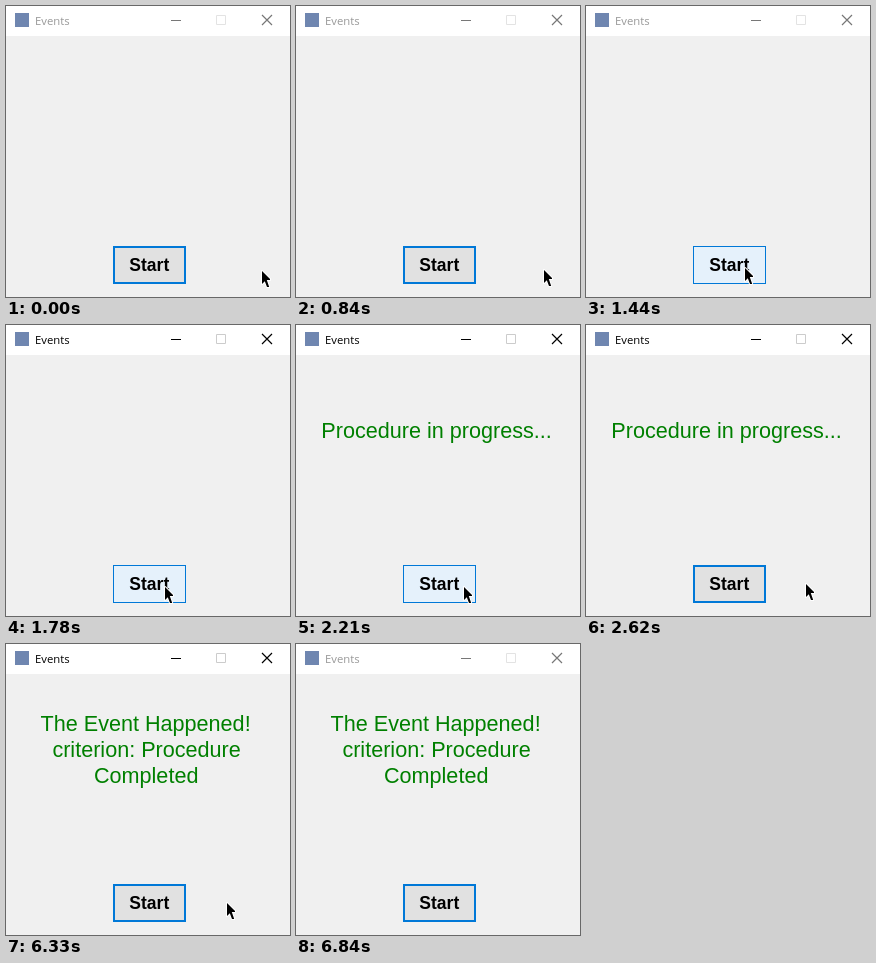
An HTML page for the animation above (6900 ms loop, 284x291 px).

```html
<!DOCTYPE html>
<html lang="en">
<head>
<meta charset="utf-8">
<title>Events</title>
<style>
  html, body { margin: 0; width: 100%; height: 100%; overflow: hidden; background: #f0f0f0; }
  svg { display: block; width: 100%; height: 100%; }
  .caption { font: 11.3px "Open Sans", "Noto Sans", sans-serif; }
  .label { font: 21.6px "Liberation Sans", Arial, sans-serif; fill: #008000; text-anchor: middle; }
  .start { font: bold 17.5px "Liberation Sans", Arial, sans-serif; text-anchor: middle; }
</style>
</head>
<body>
<svg viewBox="0 0 284 291">
  <rect width="284" height="291" fill="#f0f0f0"/>
  <rect width="284" height="30" fill="#fff"/>
  <rect x="9" y="7" width="14" height="14" fill="#6f86b0"/>
  <text id="caption" class="caption" x="29" y="19">Events</text>
  <g fill="none">
    <path id="minimize" d="M165 14.5h10"/>
    <path id="maximize" d="M210.5 9.5h9v9h-9z"/>
    <path id="close" d="M256 9l10 10M266 9l-10 10" stroke-width="1.2"/>
  </g>
  <g id="progress" class="label">
    <text x="140.6" y="113">Procedure in progress...</text>
  </g>
  <g id="done" class="label">
    <text x="139.6" y="87">The Event Happened!</text>
    <text x="140.6" y="113">criterion: Procedure</text>
    <text x="140.2" y="139">Completed</text>
  </g>
  <rect id="edge" x="107" y="240" width="73" height="38"/>
  <rect id="face"/>
  <text class="start" x="143.3" y="265">Start</text>
  <path id="cursor" d="M0 0V13L2.8 10.3L5 16H7.2L4.8 9H8V8Z"
    fill="#000" stroke="#fff" stroke-width="2" stroke-linejoin="round" paint-order="stroke"/>
</svg>
<script>
const LOOP = 6900;
const el = id => document.getElementById(id);
const set = (id, attrs) => {
  for (const name in attrs) el(id).setAttribute(name, attrs[name]);
};
const show = (id, on) => set(id, { visibility: on ? 'visible' : 'hidden' });
const between = (t, from, to) => t >= from && t < to;

// Pointer moves: first step, last step, number of steps, end position
const moves = [
  [780, 900, 3, 244, 263],
  [1050, 1440, 6, 159, 262],
  [2210, 2620, 7, 220, 259],
  [6330, 6330, 1, 221, 259],
  [6540, 6690, 3, 251, 298]
];

function pointerAt(t) {
  let x = 256, y = 265;
  for (const [start, end, steps, toX, toY] of moves) {
    if (t < start) break;
    const step = t >= end ? steps : 1 + Math.floor((t - start) / (end - start) * (steps - 1));
    x += (toX - x) * step / steps;
    y += (toY - y) * step / steps;
  }
  return [Math.round(x), Math.round(y)];
}

function drawButton(hover, pressed) {
  const border = hover ? 1 : 2;
  set('edge', { fill: pressed ? '#005499' : '#0078d7' });
  set('face', {
    x: 107 + border, y: 240 + border,
    width: 73 - 2 * border, height: 38 - 2 * border,
    fill: pressed ? '#cce4f7' : hover ? '#e5f1fb' : '#e1e1e1'
  });
}

function render(t) {
  const active = between(t, 1630, 6840);
  const [x, y] = pointerAt(t);
  set('caption', { fill: active ? '#000' : '#999' });
  set('minimize', { stroke: active ? '#000' : '#777' });
  set('close', { stroke: active ? '#000' : '#777' });
  set('maximize', { stroke: active ? '#ccc' : '#e3e3e3' });
  show('progress', between(t, 1870, 4270));
  show('done', t >= 4270);
  drawButton(x < 180, between(t, 1630, 1780));
  set('cursor', { transform: `translate(${x} ${y})` });
  show('cursor', t < 6690);
}

const begin = performance.now();
function tick() {
  render((performance.now() - begin) % LOOP);
  requestAnimationFrame(tick);
}
tick();
</script>
</body>
</html>
```
